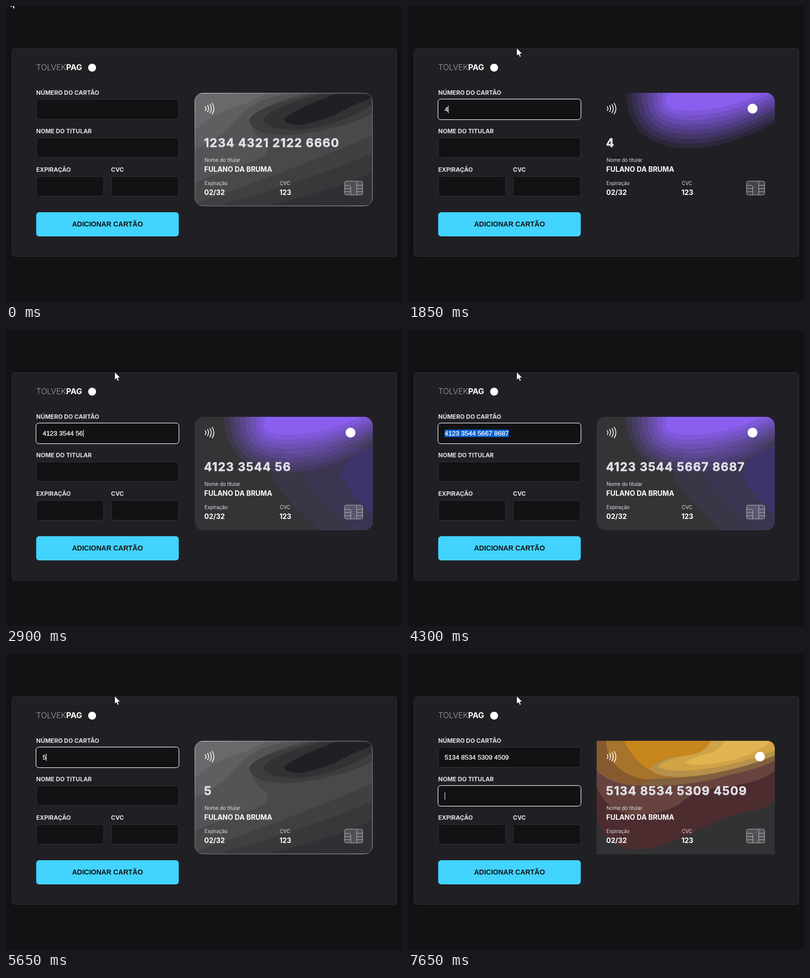
Write an HTML page that moves like this. It is 800 px wide and 600 px high and loops after 8 s.

```html
<!DOCTYPE html>
<html lang="pt-BR">
<head>
<meta charset="utf-8">
<title>Cartão</title>
<style>
  html, body { margin: 0; width: 100%; height: 100%; overflow: hidden; background: #121214; }
  svg { display: block; width: 800px; height: 600px; font-family: Inter, sans-serif; }
  .label { font-size: 12px; font-weight: 700; fill: #e1e1e6; }
  .field { fill: #121214; stroke: #323238; }
  .caption { font-size: 10px; fill: #e1e1e6; }
  .value { font-size: 14px; font-weight: 700; fill: #fff; }
  .digits { font-size: 24px; font-weight: 700; letter-spacing: .052em; fill: #e1e1e6; stroke: #e1e1e6; stroke-width: .6px; }
  .arial { font-family: "Liberation Sans", Arial, sans-serif; }
  .line { fill: none; stroke: #fff; }
</style>
</head>
<body>
<svg viewBox="0 0 800 600">
  <defs>
    <clipPath id="roundCard"><rect x="381" y="176" width="360" height="230" rx="18"/></clipPath>
    <clipPath id="goldCard"><path d="M381 176H723Q741 176 741 194V406H381Z"/></clipPath>
    <linearGradient id="edge" x2="1" y2="1">
      <stop stop-color="#b4b4b8"/><stop offset=".3" stop-color="#77757f"/>
      <stop offset=".6" stop-color="#66666a"/><stop offset="1" stop-color="#8a8a8e"/>
    </linearGradient>
  </defs>
  <rect width="800" height="600" fill="#121214"/>
  <rect x="12.5" y="86.5" width="777" height="421" rx="5" fill="#202024" stroke="#323238"/>

  <text x="61" y="130" font-size="16" font-weight="300" fill="#a0a0a6">TOLVEK<tspan font-weight="700" fill="#fff">PAG</tspan></text>
  <circle cx="174" cy="125" r="8" fill="#fff"/>

  <text class="label" x="61" y="180">NÚMERO DO CARTÃO</text>
  <text class="label" x="61" y="258">NOME DO TITULAR</text>
  <text class="label" x="61" y="336">EXPIRAÇÃO</text>
  <text class="label" x="212" y="336">CVC</text>
  <rect class="field" x="61.5" y="189.5" width="287" height="40" rx="5"/>
  <rect class="field" x="61.5" y="267.5" width="287" height="40" rx="5"/>
  <rect class="field" x="61.5" y="345.5" width="136" height="40" rx="5"/>
  <rect class="field" x="212.5" y="345.5" width="136" height="40" rx="5"/>
  <rect id="ring" class="line" x="60.5" y="188.5" width="289" height="42" rx="6"/>
  <rect id="selection" x="74" y="202" height="15" fill="#0a63d0"/>
  <text id="typed" class="arial" x="74" y="214" font-size="13.333" fill="#fff" stroke="#fff" stroke-width=".3"></text>
  <rect id="caret" width="1" height="15" fill="#fff"/>
  <rect x="61" y="418" width="288" height="49" rx="6" fill="#42d3ff"/>
  <text class="arial" x="205" y="447" font-size="14" font-weight="700" text-anchor="middle" fill="#121214">ADICIONAR CARTÃO</text>

  <g id="gray" clip-path="url(#roundCard)"></g>
  <g id="purple" clip-path="url(#roundCard)"><g id="purpleBase"></g></g>
  <g id="gold" clip-path="url(#goldCard)"></g>

  <g id="waves" class="line" stroke-width="1.6" stroke-linecap="round"></g>
  <circle id="badge" cy="208" r="10" fill="#fff"/>
  <text id="number" class="digits" x="400" y="286"></text>
  <text class="caption" x="401" y="316">Nome do titular</text>
  <text class="value" x="400.5" y="336">FULANO DA BRUMA</text>
  <text class="caption" x="401" y="363">Expiração</text>
  <text class="value" x="400.5" y="383">02/32</text>
  <text class="caption" x="553" y="363">CVC</text>
  <text class="value" x="552.5" y="383">123</text>
  <g fill="none" stroke="#b4b4b8">
    <rect x="684" y="355" width="36.5" height="28" rx="4" fill="#fff" fill-opacity=".16"/>
    <path d="M684 363.5H693Q696.5 363.5 696.5 367V383M708.5 355V383M684 370H696.5M684 376.5H696.5M708.5 363.5H720.5M708.5 370H720.5M708.5 376.5H720.5"/>
  </g>

  <g id="cursor">
    <path id="arrow" d="M0 0V16.5L3.8 13L6.2 18.6L9 17.4L6.6 11.9H11.6Z" fill="#fff" stroke="#000" stroke-width=".8"/>
    <path id="beam" class="line" d="M-3 -8H3M0 -8V8M-3 8H3"/>
  </g>
</svg>
<script>
const LOOP = 8000, STEP = 50;
const el = id => document.getElementById(id);
const show = (id, on) => el(id).setAttribute('visibility', on ? 'visible' : 'hidden');
const set = (id, attrs) => { for (const k in attrs) el(id).setAttribute(k, attrs[k]); };

function addPath(parent, d, attrs) {
  const path = document.createElementNS('http://www.w3.org/2000/svg', 'path');
  path.setAttribute('d', d);
  for (const k in attrs) path.setAttribute(k, attrs[k]);
  el(parent).append(path);
}
const paint = (parent, layers) => layers.forEach(([fill, d]) => addPath(parent, d, { fill }));
const FULL = 'M381 176H741V406H381Z';

paint('gray', [
  ['#49494b', FULL],
  ['#545456', 'M381 176H610Q520 196 492 232Q498 262 528 282Q534 302 500 314L381 358Z'],
  ['#5f5f61', 'M381 176H570Q500 192 472 222Q445 262 381 292Z'],
  ['#69696b', 'M381 176H525Q485 202 440 212Q405 230 381 252Z'],
  ['#404043', 'M381 400Q560 340 741 262V406H381Z'],
  ['#38383b', 'M425 406Q600 358 741 298V406Z'],
  ['#303034', 'M525 406Q650 376 741 338V406Z'],
  ['#3d3d40', 'M630 176Q500 204 491 232Q498 262 570 262Q660 256 741 218V176Z'],
  ['#323235', 'M648 176Q530 206 519 230Q524 250 590 252Q670 244 741 200V176Z'],
  ['#202024', 'M672 176Q575 212 561 230Q568 242 595 241Q645 234 695 204L741 185V176Z'],
]);
addPath('gray', 'M399 176.7H723Q740.3 176.7 740.3 194V388Q740.3 405.3 723 405.3H399Q381.7 405.3 381.7 388V194Q381.7 176.7 399 176.7Z',
  { fill: 'none', stroke: 'url(#edge)', 'stroke-width': 1.4 });

paint('purpleBase', [
  ['#343437', FULL],
  ['#3a3647', 'M570 245Q530 275 538 300Q548 326 632 406H741V236Z'],
  ['#3b3552', 'M645 245Q596 272 603 300Q612 324 705 406H741V236Z'],
  ['#3f336c', 'M741 236Q680 262 677 290Q678 312 741 375Z'],
]);
// Nested rings whose opacity adds up evenly towards the centre
const RINGS = 9;
for (let k = 0; k < RINGS; k++) {
  const left = 441 + k * 10.5, bottom = 289 - k * 9.6, right = 237 - k * 9;
  addPath('purple', `M${left} 176C${left} ${bottom - 30} 500 ${bottom} 570 ${bottom}C630 ${bottom} 690 ${right + 26} 741 ${right}V176Z`,
    { fill: '#8a5ff0', 'fill-opacity': 1 / (RINGS - k) });
}

paint('gold', [
  ['#323235', FULL],
  ['#4d2c2f', 'M381 176V330Q395 382 445 395Q500 403 585 357Q645 326 695 318Q741 308 741 290V176Z'],
  ['#67433f', 'M381 176V270Q400 318 455 326Q510 328 552 302Q580 272 650 268Q720 258 741 236V176Z'],
  ['#80603f', 'M381 176V236Q415 268 470 266Q560 272 650 245Q710 232 741 216V176Z'],
  ['#87592f', 'M381 176V232Q415 268 470 264Q500 255 510 225L430 176Z'],
  ['#a6742c', 'M400 176Q402 225 450 246Q475 258 510 252Q620 252 741 206V176Z'],
  ['#c6861b', 'M437 176Q455 216 490 236Q560 248 741 198V176Z'],
  ['#b5914a', 'M490 234Q498 213 560 206Q600 200 612 176H741V206Q650 242 560 249Q500 250 490 234Z'],
  ['#d1a347', 'M505 228Q515 212 575 204Q603 198 612 176H741V196Q650 230 570 236Q515 238 505 228Z'],
  ['#e0b451', 'M560 220Q575 208 615 200Q630 192 640 176H735Q700 208 630 220Q575 230 560 220Z'],
]);

for (let i = 0; i < 4; i++) {
  const h = 4 + i * 2.3;
  addPath('waves', `M${402.5 + i * 4.7} ${208 - h}q${3 + i * 1.3} ${h} 0 ${2 * h}`);
}

const TYPING = [
  [0, ''], [1850, '4'], [2100, '41'], [2500, '412'], [2550, '4123'], [2700, '4123 354'],
  [2900, '4123 3544 56'], [3200, '4123 3544 5667'], [3350, '4123 3544 5667 8'],
  [3500, '4123 3544 5667 8687'], [4650, ''], [5600, '5'], [5800, '51'], [6150, '513'],
  [6200, '5134'], [6300, '5134 8'], [6400, '5134 85'], [6450, '5134 853'], [6500, '5134 8534'],
  [6550, '5134 8534 5'], [6700, '5134 8534 530'], [6750, '5134 8534 5309'],
  [6850, '5134 8534 5309 45'], [6900, '5134 8534 5309 4509'],
];
const MOUSE = [
  [150, 9, -13], [400, 651, 365], [500, 636, 362], [650, 636, 362],
  [1150, 215, 209], [1200, 215, 209], [1300, 219.5, 85],
];

function mouseAt(t) {
  const next = MOUSE.findIndex(key => key[0] > t);
  if (next === 0) return MOUSE[0].slice(1);
  if (next < 0) return MOUSE.at(-1).slice(1);
  const [t0, x0, y0] = MOUSE[next - 1], [t1, x1, y1] = MOUSE[next];
  const p = (t - t0) / (t1 - t0);
  return [x0 + (x1 - x0) * p, y0 + (y1 - y0) * p];
}

function draw(t) {
  const between = (a, b) => t >= a && t < b;
  const text = TYPING.findLast(key => key[0] <= t)[1];
  const kind = text[0] === '4' ? 'purple' : text.startsWith('51') ? 'gold' : 'gray';
  for (const name of ['gray', 'purple', 'gold']) el(name).style.display = name === kind ? '' : 'none';
  el('purpleBase').style.display = text.length > 1 ? '' : 'none';
  show('badge', kind !== 'gray');
  set('badge', { cx: kind === 'purple' ? 696 : 711 });

  el('typed').textContent = text;
  el('number').textContent = text || '1234 4321 2122 6660';
  const width = text ? el('typed').getComputedTextLength() : 0;
  const selected = between(4200, 4650), onName = t >= 7600;
  show('selection', selected);
  set('selection', { width });
  show('ring', t >= 1200);
  set('ring', { y: onName ? 266.5 : 188.5 });
  show('caret', t >= 1200 && !selected && !between(1700, 1850) && !between(5150, 5600));
  set('caret', { x: Math.round(74 + (onName ? 0 : width)), y: onName ? 280 : 202 });

  const [x, y] = mouseAt(t);
  const overField = x > 61 && x < 349 && y > 189 && y < 230;
  set('cursor', { transform: `translate(${x} ${y})` });
  show('arrow', !overField);
  show('beam', overField);
}

const start = performance.now();
function tick() {
  const t = (performance.now() - start) % LOOP;
  draw(Math.floor(t / STEP) * STEP);
  requestAnimationFrame(tick);
}
tick();
</script>
</body>
</html>
```
